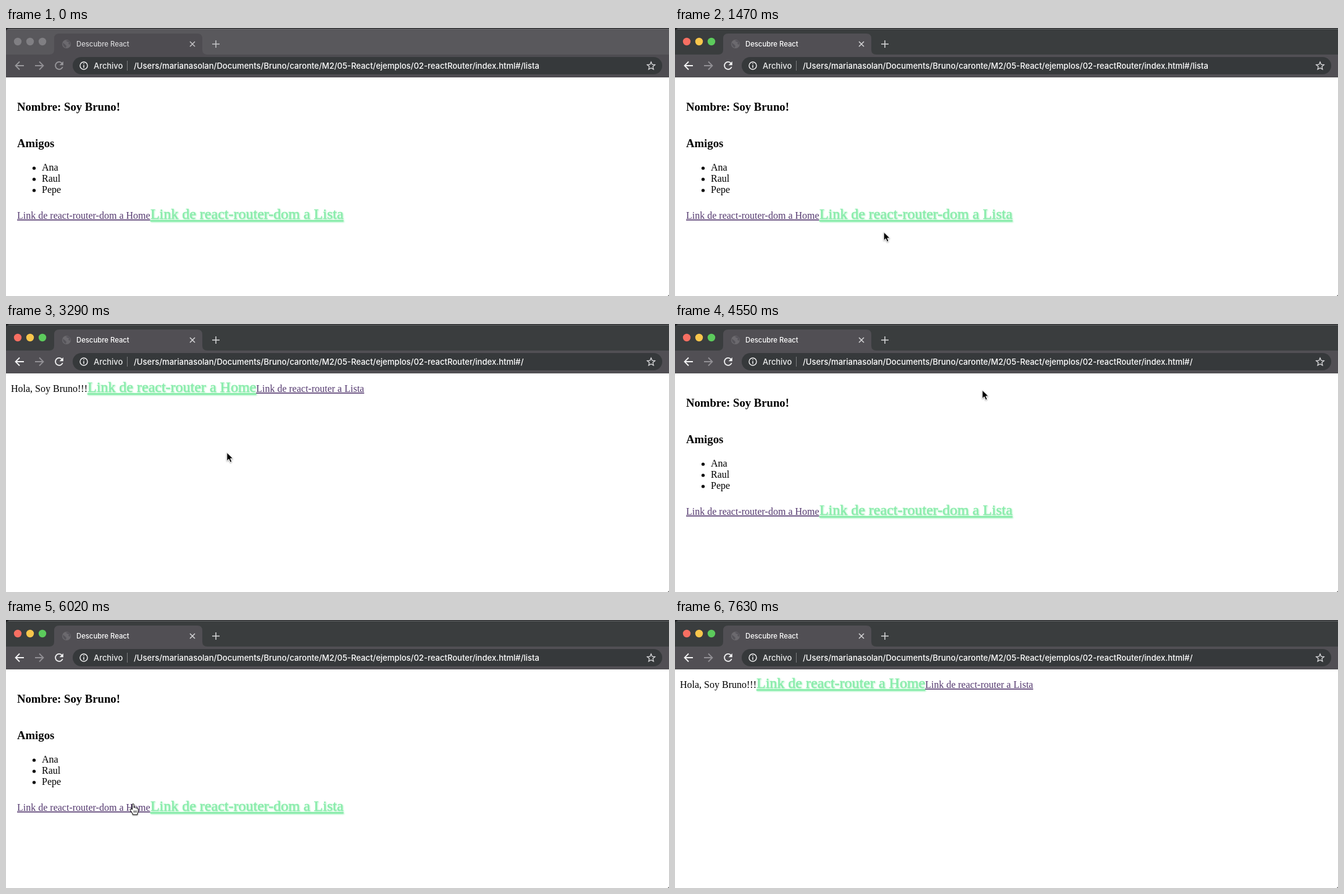
An HTML page for the animation above (7.84 s loop, 1074x434 px).

```html
<!DOCTYPE html>
<html lang="es">
<head>
<meta charset="utf-8">
<title>Descubre React</title>
<style>
  html, body { margin: 0; width: 100%; height: 100%; overflow: hidden; background: #fff; }
  svg { display: block; width: 1074px; height: 434px; }
  text { white-space: pre; }
  .ui { font: 500 13.05px Inter, Roboto, sans-serif; fill: #fff; }
  .tab { font-size: 11.3px; }
  .info { font-size: 12.9px; fill: #eceded; }
  .page { font: 16px "Liberation Serif", "Times New Roman", serif; fill: #000; }
  .page .head { font-size: 18.72px; font-weight: bold; }
  .link { fill: #553a70; text-decoration: underline; }
  .on { font-size: 24px; fill: #88ecaa; stroke: #88ecaa; stroke-width: .4; filter: drop-shadow(1px 1px 1px rgba(136, 236, 170, .75)); }
  .line { fill: none; stroke: #f1f1f2; stroke-width: 1.8; }
  #strip { fill: #3a3d3e; }
  .bar { fill: #514f54; }
  .idle #strip { fill: #59585c; }
  .idle .bar { fill: #4e4c51; }
  .idle .lights circle { fill: #807f83; }
  .idle .dim { stroke: #98979b; }
  .idle .tab { fill: #d6d6d8; }
  .idle .small { stroke: #c4c3c6; }
  .small { stroke: #d6d6d8; stroke-width: 1.5; }
</style>
</head>
<body>
<svg id="stage" class="idle" viewBox="0 0 1074 434">
  <rect width="1074" height="434" fill="#fff"/>

  <rect width="1074" height="80" fill="#1a1b1d"/>
  <path id="strip" d="M0 80V6Q0 1 5 1H1074V80Z"/>
  <path d="M4 1.5H1074" stroke="#6a6b6d" stroke-width="1"/>
  <path class="bar" d="M0 43H70Q78 43 78 35V17Q78 9 86 9H310Q318 9 318 17V35Q318 43 326 43H1074V80H0Z"/>

  <g class="lights">
    <circle cx="19" cy="22" r="6.2" fill="#f86f62"/>
    <circle cx="39" cy="22" r="6.2" fill="#f8c64c"/>
    <circle cx="59" cy="22" r="6.2" fill="#5ccb5c"/>
  </g>

  <circle cx="98" cy="26" r="7" fill="#6b696e"/>
  <path d="M92 24Q96 26 98 29Q97 31 97 32Q92 30 92 24ZM97 20Q99 23 102 23L101 26Q104 26 104 28Q105 22 101 20Z" fill="#56545a"/>
  <text class="ui tab" x="114" y="30">Descubre React</text>
  <path class="line small" d="M298 22L306 30M306 22L298 30"/>
  <path class="line small" d="M334 26H346M340 20V32"/>

  <path class="line dim" d="M29 61H16M22 54.5L15.5 61L22 67.5"/>
  <path class="line" d="M47 61H60M54 54.5L60.5 61L54 67.5" style="stroke:#918f94"/>
  <path class="line dim" d="M90.8 57.2A6 6 0 1 0 91.7 63"/>
  <path d="M92.8 54V60.2H86.6Z" fill="#f1f1f2" id="reload"/>

  <rect x="108" y="47" width="955" height="28" rx="14" fill="#36393b"/>
  <circle class="line" cx="126" cy="61" r="6" style="stroke-width:1.4"/>
  <path class="line" d="M126 57V58.6M126 60V64.6" style="stroke-width:1.5"/>
  <text class="ui info" x="142" y="66">Archivo</text>
  <path d="M196.5 53V69" stroke="#797b7d"/>
  <text class="ui" id="url" x="207" y="66"></text>
  <path class="line" d="M1045 55L1046.8 59.2L1051.3 59.6L1047.9 62.6L1048.9 67L1045 64.7L1041.1 67L1042.1 62.6L1038.7 59.6L1043.2 59.2Z" style="stroke-width:1.3;stroke:#dcdcde"/>

  <g class="page" id="list">
    <text class="head" x="18" y="134">Nombre: Soy Bruno!</text>
    <text class="head" x="18" y="193">Amigos</text>
    <circle cx="45.5" cy="227" r="2.6"/>
    <circle cx="45.5" cy="245" r="2.6"/>
    <circle cx="45.5" cy="263" r="2.6"/>
    <text x="58" y="231">Ana</text>
    <text x="58" y="249">Raul</text>
    <text x="58" y="267">Pepe</text>
    <text class="link" x="18" y="309">Link de react-router-dom a Home</text>
    <text class="link on" x="233.9" y="309">Link de react-router-dom a Lista</text>
  </g>
  <g class="page" id="home">
    <text x="8" y="110">Hola, Soy Bruno!!!</text>
    <text class="link on" x="132" y="110">Link de react-router a Home</text>
    <text class="link" x="405.2" y="110">Link de react-router a Lista</text>
  </g>
  <path d="M1074 432V434H1072Z" fill="#555"/>

  <g id="cursor" style="filter:drop-shadow(0 1px 1px rgba(0,0,0,.35))">
    <path id="arrow" d="M.8 .2V13.8L4 10.8L6.2 16L8.8 14.9L6.6 9.9H10.8Z" fill="#000" stroke="#fff" stroke-width="1"/>
    <g id="hand" fill="#fff" stroke="#000" stroke-width="1" stroke-linejoin="round">
      <path d="M-1.6 9V1.2Q-1.5 -.3 -.2 -.3Q1.2 -.3 1.2 1.2V6Q2.4 4.8 3.6 6.2Q5 5.4 5.9 6.8Q8.2 6.6 8.2 9V11.5Q8 13.6 7 14.8V17.2H-.8V15.4Q-2.6 13.5 -4.8 9.6Q-5 7.4 -3.2 7.9Z"/>
      <path d="M1.2 10.5V14M3.2 10.5V14M5.2 10.5V14" fill="none" stroke-width=".8"/>
    </g>
  </g>
</svg>
<script>
  const LOOP = 7840, STEP = 70;
  const BASE = "/Users/marianasolan/Documents/Bruno/caronte/M2/05-React/ejemplos/02-reactRouter/index.html#/";
  const $ = id => document.getElementById(id);

  // time, x, y of the pointer tip
  const path = [
    [70, 560, 434], [350, 524, 372], [560, 524, 371], [630, 525, 366],
    [910, 525, 366], [1680, 267, 317], [1960, 223, 304], [3010, 221, 304],
    [3290, 357, 208], [3780, 512, 124], [4060, 497, 107], [5040, 497, 107],
    [5250, 402, 152], [5390, 313, 209], [5810, 206, 298], [6720, 206, 298],
    [7420, 262, 394]
  ];
  const overLink = [[1890, 2590], [3920, 4480], [5740, 6160]];
  const homeShown = [[2590, 4480], [6160, LOOP]];
  const homeUrl = [[2800, 4690], [6440, LOOP]];

  const within = (spans, t) => spans.some(([a, b]) => t >= a && t < b);
  const show = (id, on) => $(id).setAttribute("visibility", on ? "visible" : "hidden");

  function pointer(t) {
    const i = path.findIndex(p => p[0] > t);
    if (i < 1) return null;
    const [t0, x0, y0] = path[i - 1], [t1, x1, y1] = path[i];
    const k = (t - t0) / (t1 - t0);
    return [x0 + (x1 - x0) * k, y0 + (y1 - y0) * k];
  }

  function draw(now) {
    const t = Math.floor((now % LOOP) / STEP) * STEP;
    const idle = t < 560, home = within(homeShown, t), hand = within(overLink, t);
    $("stage").setAttribute("class", idle ? "idle" : "");
    $("reload").setAttribute("fill", idle ? "#98979b" : "#f1f1f2");
    $("url").textContent = BASE + (within(homeUrl, t) ? "" : "lista");
    show("home", home);
    show("list", !home);

    const at = pointer(t);
    show("arrow", at && !hand);
    show("hand", at && hand);
    if (at) $("cursor").setAttribute("transform", `translate(${at[0]} ${at[1]})`);
  }

  const start = performance.now();
  function tick() {
    draw(performance.now() - start);
    requestAnimationFrame(tick);
  }
  tick();
</script>
</body>
</html>
```
